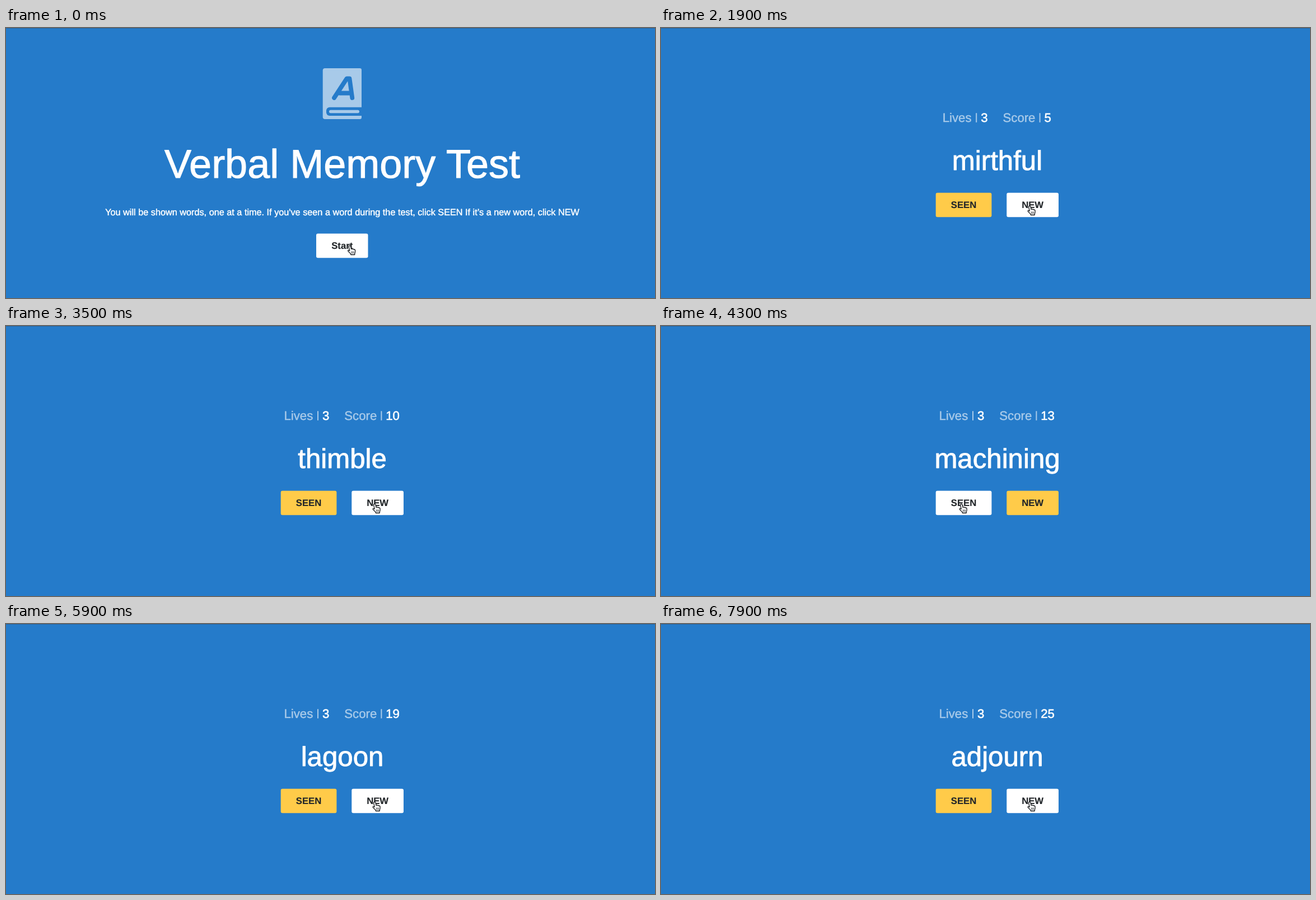
Animation, 1159 px wide and 483 px high, one loop 8 s. Source, as an HTML page with a canvas:

```html
<!DOCTYPE html>
<html lang="en">
<head>
<meta charset="utf-8">
<title>Verbal Memory Test</title>
<style>
  html, body { margin: 0; width: 100%; height: 100%; overflow: hidden; background: #257bca; }
  canvas { display: block; width: 1159px; height: 483px; }
</style>
</head>
<body>
<canvas id="stage"></canvas>
<script>
const W = 1159, H = 483, LOOP = 8000, CENTER = 600.5;
const BLUE = '#257bca', PALE = '#a8cae9', YELLOW = '#ffcb49', INK = '#222629', WHITE = '#fff';
const FAMILY = '"Liberation Sans", Arial, sans-serif';

const canvas = document.getElementById('stage');
const ratio = window.devicePixelRatio || 1;
canvas.width = Math.round(W * ratio);
canvas.height = Math.round(H * ratio);
const ctx = canvas.getContext('2d');
ctx.scale(ratio, ratio);

// Each round: time it appears and its word; the score is the index.
const GAME_START = 300;
const rounds = [
  [300, 'lantern'], [700, 'gallop'], [1000, 'whenever'], [1200, 'preponderant'],
  [1500, 'sedated'], [1800, 'mirthful'], [2100, 'perambulate'], [2300, 'quarry'],
  [2600, 'inditing'], [2900, 'perambulate'], [3200, 'thimble'], [3600, 'cloister'],
  [3900, 'sedated'], [4200, 'machining'], [4500, 'gallop'], [4800, 'kindred'],
  [5100, 'witchy'], [5300, 'tumbler'], [5600, 'quarry'], [5900, 'lagoon'],
  [6200, 'uncompromisingly'], [6600, 'overflew'], [6900, 'handkerchief'],
  [7200, 'brisk'], [7500, 'peripheral'], [7800, 'adjourn']
];

const spots = { start: [614, 389.3], seen: [536.5, 318.3], fresh: [658.5, 318.3] };
const MOVE = 180;
const moves = [
  [0, 'start'], [300, 'fresh'], [1500, 'seen'], [1700, 'fresh'], [2900, 'seen'],
  [3150, 'fresh'], [3900, 'seen'], [5320, 'fresh'], [5900, 'seen'], [6420, 'fresh'],
  [7200, 'seen'], [7620, 'fresh']
];

const lastBefore = (list, t) => list.reduce((found, item, i) => item[0] <= t ? i : found, -1);

function cursorAt(t) {
  const i = lastBefore(moves, t);
  const to = spots[moves[i][1]];
  const from = i ? spots[moves[i - 1][1]] : to;
  const p = Math.min(1, (t - moves[i][0]) / MOVE);
  const k = p * p * (3 - 2 * p);
  return from.map((v, axis) => v + (to[axis] - v) * k);
}

// A thin outline thickens the letters by `extra`.
function text(str, x, y, size, color, { align = 'left', weight = 400, extra = 0.45 } = {}) {
  ctx.font = `${weight} ${size}px ${FAMILY}`;
  ctx.textRendering = 'geometricPrecision';
  ctx.textAlign = align;
  ctx.fillStyle = ctx.strokeStyle = color;
  ctx.fillText(str, x, y);
  ctx.lineWidth = extra;
  ctx.lineJoin = 'round';
  ctx.strokeText(str, x, y);
}

function box(x, y, w, h, r, color) {
  ctx.fillStyle = color;
  ctx.beginPath();
  ctx.roundRect(x, y, w, h, r);
  ctx.fill();
}

function button(label, x, y, w, color) {
  box(x, y, w, 43.5, 3, color);
  text(label, x + w / 2, y + 27.3, 16.7, INK, { align: 'center', weight: 700, extra: 0.15 });
}

function drawBook() {
  box(565.7, 72, 69.3, 91, [4, 3, 3, 4], PALE);
  box(572, 141.8, 64, 15.2, [6, 0, 0, 6], BLUE);
  box(577, 146.8, 54, 5.4, 2.7, PALE);
  ctx.strokeStyle = BLUE;
  ctx.lineWidth = 7.8;
  ctx.lineCap = ctx.lineJoin = 'round';
  ctx.stroke(new Path2D('M586 125L608.5 90.5L613.5 90.5L618.3 125M596 116.5L615 116.5'));
}

const hand = new Path2D(
  'M-1.9 1.6C-1.7 -.4 1 -.4 1.5 1.4L2.6 6.2C3.2 5.1 4.9 5.3 5.2 6.6' +
  'C6 5.7 7.3 6 7.6 7.2C8.5 6.6 9.5 7.2 9.6 8.4C9.8 10.6 9.7 12.4 8.8 14.2' +
  'L8.7 16.2L1.8 16.2L1.5 14.6L-2.8 10.2C-4.1 8.7 -2.7 7.5 -1.3 8.5L-.3 9.3Z');
const creases = new Path2D('M3 10.5V13.8M5 10.5V13.8M7 10.5V13.8');

function drawHand([x, y]) {
  ctx.save();
  ctx.translate(x, y);
  ctx.lineJoin = 'round';
  ctx.lineWidth = 1.3;
  ctx.fillStyle = WHITE;
  ctx.strokeStyle = '#15181b';
  ctx.fill(hand);
  ctx.stroke(hand);
  ctx.lineWidth = 0.8;
  ctx.stroke(creases);
  ctx.restore();
}

function drawIntro() {
  drawBook();
  text('Verbal Memory Test', CENTER, 268, 72, WHITE, { align: 'center', extra: 1.1 });
  text("You will be shown words, one at a time. If you've seen a word during the test, " +
    'click SEEN If it’s a new word, click NEW', CENTER, 334.5, 16.25, WHITE, { align: 'center' });
  button('Start', 554, 367.8, 92.5, WHITE);
}

function drawStat(label, value, x, barX, valueX) {
  text(label, x, 168.3, 22.2, PALE);
  ctx.fillStyle = PALE;
  ctx.fillRect(barX, 152.2, 2, 16.6);
  text(String(value), valueX, 168.3, 22.2, WHITE, { extra: 0.6 });
}

function drawGame(t, [cx]) {
  const score = lastBefore(rounds, t);
  const shift = score > 9 ? -6.2 : 0;
  drawStat('Lives', 3, 502.7 + shift, 562.2 + shift, 571.2 + shift);
  drawStat('Score', score, 610.5 + shift, 675.6 + shift, 684.4 + shift);
  text(rounds[score][1], CENTER, 254, 49.2, WHITE, { align: 'center', extra: 0.9 });
  button('SEEN', 490.7, 294.8, 99.7, cx < 590 ? WHITE : YELLOW);
  button('NEW', 617.3, 294.8, 92.7, cx > 617 ? WHITE : YELLOW);
}

function draw() {
  const t = performance.now() % LOOP;
  const cursor = cursorAt(t);
  ctx.fillStyle = BLUE;
  ctx.fillRect(0, 0, W, H);
  ctx.fillStyle = '#2a659c';
  ctx.fillRect(0, 0, W, 1);
  if (t < GAME_START) drawIntro();
  else drawGame(t, cursor);
  drawHand(cursor);
  requestAnimationFrame(draw);
}
draw();
</script>
</body>
</html>
```
